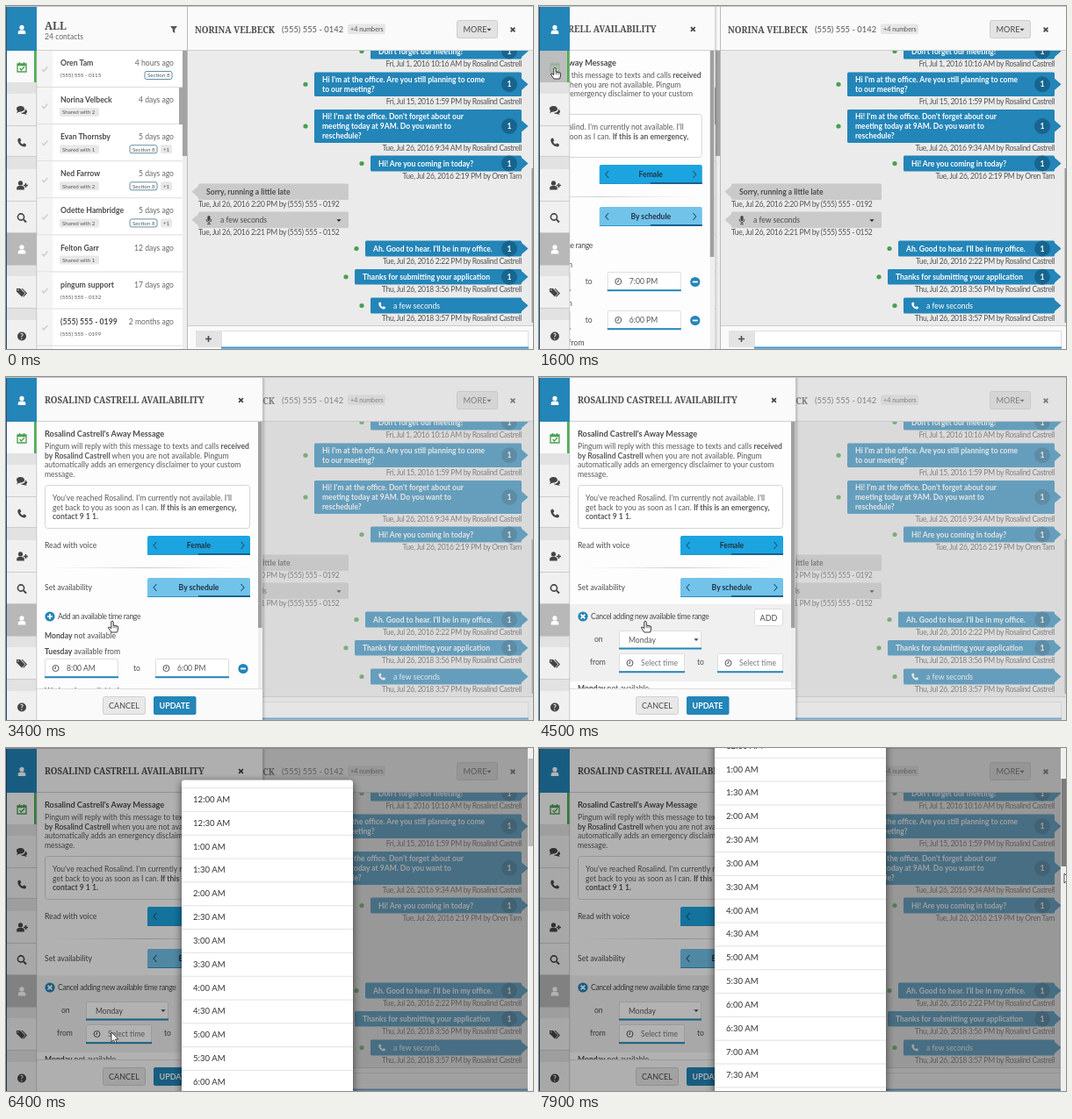
These frames come from a looping animation (600x391 px, 8 s). An HTML page:

```html
<!DOCTYPE html>
<html lang="en">
<head>
<meta charset="utf-8">
<title>Availability settings</title>
<style>
html, body { margin: 0; width: 100%; height: 100%; overflow: hidden; background: #fff; }
svg { display: block; width: 600px; height: 391px; font-family: Lato, "Open Sans", sans-serif; font-size: 8.6px; }
.slab { font-family: "Noto Serif", "DejaVu Serif", serif; font-weight: 700; }
.b { font-weight: 700; }
.tight { letter-spacing: -.35px; }
</style>
</head>
<body>
<svg id="stage" viewBox="0 0 600 391"></svg>
<script>
const BLUE = '#2385b8', INK = '#4c4c4c', BAR = '#fafafa', ME = 'Rosalind Castrell', LOOP = 8000;

// Markup helpers
const rect = (x, y, w, h, fill, extra = '') => `<rect x="${x}" y="${y}" width="${w}" height="${h}" fill="${fill}" ${extra}/>`;
const line = (x1, y, x2, color) => rect(x1, y, x2 - x1, 1, color);
const circle = (x, y, r, fill) => `<circle cx="${x}" cy="${y}" r="${r}" fill="${fill}"/>`;
const path = (d, fill = 'none', extra = '') => `<path d="${d}" fill="${fill}" ${extra}/>`;
const stroke = (d, color, w = 1.2) => path(d, 'none', `stroke="${color}" stroke-width="${w}"`);
const group = (content, id = '', extra = '') => `<g ${id && `id="${id}"`} ${extra}>${content}</g>`;
const at = (x, y, content, scale = 1) => group(content, '', `transform="translate(${x} ${y}) scale(${scale})"`);
const text = (x, y, s, { size = 8.6, fill = INK, cls = '', anchor = 'start' } = {}) =>
  `<text x="${x}" y="${y}" font-size="${size}" fill="${fill}" class="${cls}" text-anchor="${anchor}">${s}</text>`;
const bold = s => `<tspan class="b">${s}</tspan>`;

// Icons, centred on 0,0
const icon = {
  user: c => circle(0, -2.6, 2.6, c) + path('M-4.3 5V3Q-4.3 0 0 .5Q4.3 0 4.3 3V5Z', c),
  calendar: c => stroke('M-5 -4H5V5H-5ZM-2.5 -6V-3M2.5 -6V-3M-2.4 1L-.6 3L3 -1', c, 1.3) + rect(-5, -4, 10, 2.2, c),
  chat: c => path('M-6 -1A4.5 3.2 0 1 1 0 1.7L-4 2.5L-6 4L-5 1.5Z', c) + path('M4 -1Q8 2 4.5 4L6 5.5L2 4.5Q0 4.6 -1 3.5Q4 3 4 -1Z', c),
  phone: c => path('M-4 -4.5L-2 -5L-.6 -2L-2 -.8Q-.8 1.5 1.2 2.3L2.4 .8L5 2.3L4.6 4.2Q3.6 5.4 1 4.6Q-3.4 3 -4.6 -1.6Q-4.9 -3.6 -4 -4.5Z', c),
  addUser: c => at(-1.5, 0, icon.user(c)) + stroke('M2 0H7M4.5 -2.5V2.5', c, 1.5),
  search: c => `<circle cx="-1" cy="-1" r="3.6" fill="none" stroke="${c}" stroke-width="1.6"/>` + stroke('M2 2L5 5', c, 2),
  tags: c => path('M-6 -4.5H-2L3.5 1L0 5L-6 -1Z', c) + path('M-.5 -4.5H.8L6 1L2 5.2L1.2 4.4L4.3 1Z', c) + circle(-4.2, -2.8, .8, '#eee'),
  help: c => circle(0, 0, 5, c) + text(0, 3, '?', { fill: '#eee', cls: 'b', anchor: 'middle' }),
  close: c => stroke('M-2.4 -2.4L2.4 2.4M2.4 -2.4L-2.4 2.4', c, 1.7),
  filter: c => path('M-4 -4H4L1.2 -.5V4L-1.2 2.3V-.5Z', c),
  clock: c => `<circle r="3.5" fill="none" stroke="${c}"/>` + stroke('M0 -2.2V.4H-1.6', c, .9),
  mic: c => rect(-1.6, -5, 3.2, 6, c, 'rx="1.6"') + stroke('M-3 -1Q-3 2.5 0 2.5Q3 2.5 3 -1M0 2.5V4.6M-2 4.6H2', c, .9),
  caret: c => path('M-2.6 -1.2H2.6L0 1.6Z', c),
  plus: c => circle(0, 0, 5.6, c) + stroke('M-3 0H3M0 -3V3', '#fff', 1.7),
  minus: c => circle(0, 0, 5.6, c) + stroke('M-3 0H3', '#fff', 1.8),
  cancel: c => circle(0, 0, 5.6, c) + icon.close('#fff'),
  check: c => stroke('M-3 0L-1 2.4L3.4 -2.6', c, 1.6),
};
const put = (name, x, y, color = '#444', scale = 1) => at(x, y, icon[name](color), scale);

function nav() {
  const items = [['chat', 100, 37], ['phone', 137, 35], ['addUser', 186, 37], ['search', 223, 36],
                 ['user', 259, 37], ['tags', 308, 37], ['help', 358, 34]];
  return rect(0, 0, 35, 391, '#e2e2e2') + rect(1, 0, 34, 51, BLUE) + put('user', 18, 27, '#fff') +
    rect(1, 51, 34, 36, '#fafafa') + rect(1, 51, 34, 36, '#bdbdbd', 'id="navHover"') +
    group(put('calendar', 18, 70, '#4a9f51'), 'calendar') + rect(32, 51, 3, 36, '#4caf50') +
    items.map(([name, y, h]) => {
      const active = name === 'user';
      return rect(1, y, 34, h, active ? '#b8b8b8' : '#f0f0f0') + line(1, y + h - 1, 35, '#ccc') +
        put(name, 18, y + 18.5, active ? '#fff' : '#444');
    }).join('') + rect(34.5, 51, .7, 340, '#bbb') + rect(0, 0, 1, 391, '#23507a');
}

function contacts() {
  const rows = [
    ['Oren Tam', '4 hours ago', '(555) 555 - 0115', 1], ['Norina Velbeck', '4 days ago', 'Shared with 2', 0],
    ['Evan Thornsby', '5 days ago', 'Shared with 1', 2], ['Ned Farrow', '5 days ago', 'Shared with 2', 2],
    ['Odette Hambridge', '5 days ago', 'Shared with 2', 2], ['Felton Garr', '12 days ago', 'Shared with 1', 0],
    ['pingum support', '17 days ago', '(555) 555 - 0132', 0], ['(555) 555 - 0199', '2 months ago', '(555) 555 - 0199', 0]];
  const small = { size: 6.2, fill: '#555' };
  const row = ([name, ago, note, tags], i) => {
    const y = 51 + i * 42.1, tagX = tags === 2 ? 141 : 158;
    return rect(35, y, 18, 42, '#f4f4f4') + put('check', 44, y + 21, '#d2d2d2') + line(35, y + 41, 201, '#dcdcdc') +
      text(62, y + 17, name, { size: 8.7, cls: 'b' }) + text(191, y + 17, ago, { fill: '#666', anchor: 'end' }) +
      (note[0] === 'S' ? rect(61, y + 23, 45, 10, '#e8e8e8', 'rx="2"') : '') + text(64 - (note[0] === '(') * 2, y + 30.3, note, small) +
      (tags ? rect(tagX, y + 23.5, 31, 9, '#fff', 'rx="2" stroke="#3a7391" stroke-width=".8"') + text(tagX + 3, y + 30.3, 'Section 8', small) : '') +
      (tags === 2 ? rect(176, y + 23, 13, 10, '#e8e8e8', 'rx="2"') + text(179, y + 30.3, '+1', small) : '');
  };
  return rect(35, 0, 171, 391, '#fff') + rows.map(row).join('') + rect(35, 388, 18, 3, '#f4f4f4') +
    rect(35, 0, 171, 51, BAR) + line(35, 50, 206, '#cfcfcf') +
    text(44, 27, 'ALL', { size: 12, cls: 'slab' }) + text(44, 38, '24 contacts', { fill: '#666' }) +
    put('filter', 191, 27, '#555') + rect(197, 93, 4, 42, '#a5a5a5') +
    rect(201, 51, 5, 340, '#eee') + rect(201, 51, 5, 120, '#a3a3a3') + rect(206, 0, 1, 391, '#bbb');
}

const meta = (y, s, x = 587, anchor = 'end') => text(x, y, s, { fill: '#555', cls: 'tight', anchor });

function bubble(x, top, w, h, fill, tipX) {
  const mid = top + h / 2, base = tipX < x ? x + 1 : x + w - 1;
  return rect(x, top, w, h, fill, 'rx="1.5"') + path(`M${base} ${mid - 7.5}L${tipX} ${mid}L${base} ${mid + 7.5}Z`, fill);
}

function outgoing(x, top, bottom, lines, stamp, count = true) {
  const mid = (top + bottom) / 2;
  return bubble(x, top + .6, 587 - x, bottom - top - 1.2, BLUE, 594.5) + circle(x - 10, mid, 2.6, '#48a04e') +
    lines.map((s, i) => text(x + 9, mid + 3 + (i - (lines.length - 1) / 2) * 11.2, s, { size: 8.5, fill: '#fff', cls: 'b' })).join('') +
    (count ? circle(573, mid, 9, '#17658f') + text(573, mid + 3, 1, { fill: '#fff', anchor: 'middle', cls: 'b' }) : '') +
    meta(bottom + 8, stamp);
}

const incoming = (y, content, stamp) =>
  bubble(219, y, 171, 18.5, '#cacaca', 211.5) + content + meta(y + 26.5, stamp, 219, 'start');

function thread() {
  const tue = 'Tue, Jul 26, 2016 ', thu = 'Thu, Jul 26, 2018 ', by = ' by ' + ME;
  return rect(207, 0, 393, 391, '#ebebeb') +
    outgoing(415, 42, 61, ["Don't forget our meeting!"], 'Fri, Jul 1, 2016 10:16 AM' + by) +
    outgoing(351, 75, 103.5, ["Hi I'm at the office. Are you still planning to come", 'to our meeting?'], 'Fri, Jul 15, 2016 1:59 PM' + by) +
    outgoing(351, 117.5, 156.5, ["Hi! I'm at the office. Don't forget about our", 'meeting today at 9AM. Do you want to', 'reschedule?'], tue + '9:34 AM' + by) +
    outgoing(415, 170, 189, ['Hi! Are you coming in today?'], tue + '2:19 PM by Oren Tam') +
    incoming(202.5, text(228, 215, 'Sorry, running a little late', { cls: 'b' }), tue + '2:20 PM by (555) 555 - 0192') +
    incoming(234.5, put('mic', 231, 244) + text(244, 247, 'a few seconds') + put('caret', 379, 244.5, '#222'), tue + '2:21 PM by (555) 555 - 0152') +
    outgoing(409, 267, 286, ["Ah. Good to hear. I'll be in my office."], tue + '2:22 PM' + by) +
    outgoing(397, 299.5, 318, ['Thanks for submitting your application'], thu + '3:56 PM' + by) +
    outgoing(415, 332, 351, [], thu + '3:57 PM' + by, false) +
    put('phone', 428, 341.5, '#fff', .8) + text(441, 344.5, 'a few seconds', { fill: '#fff' }) +
    rect(598.5, 185, 1.5, 176, '#999') +
    rect(207, 0, 393, 51, BAR) + line(207, 50, 600, '#cfcfcf') +
    text(215, 30.5, 'NORINA VELBECK', { size: 9.9, cls: 'slab' }) + text(314, 30, '(555) 555 - 0142', { size: 9.4, fill: '#555' }) +
    rect(389, 20.5, 43, 11.5, '#e6e6e6', 'rx="2"') + text(392, 29, '+4 numbers', { size: 7.2, fill: '#555' }) +
    rect(513.5, 16.5, 46, 20, '#e3e3e3', 'rx="2" stroke="#cecece"') + text(520.5, 30, 'MORE', { size: 9.2 }) +
    put('caret', 550, 27) + put('close', 577, 27) +
    rect(207, 364, 393, 27, BAR) + line(207, 364, 600, '#ccc') +
    rect(245.5, 370.5, 349, 20, '#fff', 'stroke="#ddd"') + rect(216, 370, 29.5, 19, '#e3e3e3') +
    stroke('M227 379.5H234M230.5 376V383', INK, 1.6) + rect(245, 388.5, 350, 2, '#3b8fd0');
}

function field(x, y, w, label, faint) {
  return rect(x + .5, y + .5, w - 1, 21, '#fff', 'rx="1" stroke="#ddd"') + rect(x, y + 20.2, w, 2, BLUE) +
    put('clock', x + 12.5, y + 11, '#555') + text(x + 25, y + 14, label, { fill: faint ? '#777' : '#555' });
}
const dayRow = (y, day, from, to) => text(44, y, bold(day) + ' available from') + field(44, y + 5, 84, from) +
  text(145, y + 19, 'to') + field(170, y + 5, 84, to) + put('minus', 270, y + 16.5, BLUE);

function stepper(y, label, value, fill) {
  return text(44, y + 14, label) + rect(161, y, 117, 22, fill, 'rx="2"') + rect(219, y + 20, 59, 2, '#17628e') +
    rect(161, y + 21, 58, 1, '#2b93c6') + stroke(`M171.5 ${y + 7}L168 ${y + 11}L171.5 ${y + 15}M267.5 ${y + 7}L271 ${y + 11}L267.5 ${y + 15}`, '#1c5677', 1.1) +
    text(219.5, y + 14, value, { cls: 'b', fill: '#234', anchor: 'middle' });
}

function panel() {
  const copy = [`Pingum will reply with this message to texts and calls ${bold('received')}`,
    `${bold('by ' + ME)} when you are not available. Pingum`,
    'automatically adds an emergency disclaimer to your custom', 'message.'];
  const away = ["You've reached Rosalind. I'm currently not available. I'll",
    `get back to you as soon as I can. ${bold('If this is an emergency,')}`, bold('contact 9 1 1.')];
  const form = rect(35, 259, 252, 88, '#f0f0f0') + put('cancel', 50, 273, BLUE) +
    text(59, 276, 'Cancel adding new available time range', { cls: 'tight' }) +
    rect(245.5, 264.5, 32, 19, '#fff', 'rx="2" stroke="#ddd"') + text(261.5, 277.5, 'ADD', { size: 9, anchor: 'middle' }) +
    text(63, 302, 'on') + rect(91.5, 289.5, 93, 20, '#fff', 'rx="1" stroke="#ddd"') + rect(91, 308.5, 94, 2, BLUE) +
    text(102, 302.5, 'Monday', { fill: '#555' }) + put('caret', 179, 299.5) +
    text(58, 328, 'from') + field(91, 315, 75, 'Select time', true) + text(180, 328, 'to') + field(203, 315, 75, 'Select time', true);
  return rect(292, 0, 4, 391, 'url(#shade)') + rect(35, 0, 257, 391, '#fdfdfd') +
    text(44, 68, bold(ME + "'s Away Message"), { size: 9.2 }) +
    copy.map((s, i) => text(44, 82 + i * 10.7, s, { fill: '#5a5a5a' })).join('') +
    rect(44.5, 123.5, 233, 49, '#fff', 'rx="3" stroke="#d5d5d5"') +
    away.map((s, i) => text(53, 141 + i * 10.6, s, { fill: '#5a5a5a' })).join('') +
    stepper(181, 'Read with voice', 'Female', '#1ba4e0') + line(44, 217, 278, 'url(#rule)') +
    stepper(229, 'Set availability', 'By schedule', '#72c3ea') +
    group(put('plus', 50, 273, BLUE) + text(59, 276, 'Add an available time range', { cls: 'tight' }), 'addLink') +
    group(form, 'form') +
    group(dayRow(298, 'Monday', '9:00 AM', '7:00 PM') +
      rect(255.5, 303.5, 29, 22, 'none', 'id="focusRing" stroke="#aaa"'), 'monday') +
    group(group(text(44, 298, bold('Monday') + ' not available'), 'mondayOff') +
      group(dayRow(342, 'Tuesday', '8:00 AM', '6:00 PM') + dayRow(387, 'Wednesday', '9:00 AM', '5:00 PM'), 'laterDays'), 'days') +
    rect(287, 51, 5, 340, '#eee') + rect(287, 51, 4.5, 235, '#a0a0a0') +
    rect(35, 0, 257, 51, BAR) + line(35, 50, 292, '#cfcfcf') +
    text(44, 30, ME.toUpperCase() + ' AVAILABILITY', { size: 9.8, cls: 'slab' }) + put('close', 267.5, 26.5) +
    group(rect(35, 355, 257, 36, BAR) + line(35, 355, 292, '#ddd') +
      rect(110.5, 364.5, 48, 20, '#e8e8e8', 'rx="2" stroke="#d0d0d0"') + text(134.5, 378, 'CANCEL', { size: 9, anchor: 'middle' }) +
      rect(168, 364, 48.5, 21, BLUE, 'rx="2"') + text(192, 378, 'UPDATE', { size: 9, cls: 'b', fill: '#fff', anchor: 'middle' }), 'footer');
}

function timeList() {
  const pitch = 26.83, box = 'rx="3"';
  return rect(200, 39, 195, 1330, '#000', box + ' opacity=".6" filter="url(#blur)"') + rect(200, 36.5, 195, 1330, '#fff', box) +
    Array.from({ length: 48 }, (_, i) => {
      const hour = Math.floor(i / 2), y = 58.5 + i * pitch;
      const label = `${hour % 12 || 12}:${i % 2 ? '30' : '00'} ${hour < 12 ? 'AM' : 'PM'}`;
      return line(200, y - pitch / 2, 395, '#e2e2e2') + text(213, y + 3.5, label, { size: 9.6, fill: '#333' });
    }).join('');
}

const tooltip = path('M39 68L43 64V59H136V77H43V72Z', '#777', 'opacity=".5"') +
  `<text x="45" y="71.5" font-size="9.6" fill="#f4f4f4" class="b" letter-spacing=".9">AVAILABILITY</text>`;
const arrow = path('M0 0V11L2.6 8.7L4.3 12.4L6 11.6L4.4 8H8Z', '#fff', 'stroke="#222" stroke-width=".8"');
const hand = path('M-1.2 1Q0 -1 1.2 1V5L6 6Q7 6.5 6.6 9L5.6 13H-1L-4.5 8Q-4.5 6.5 -3 7.2L-1.2 8.6Z', '#fff', 'stroke="#222" stroke-width=".9"') +
  stroke('M2.8 6V8.4M4.6 6.2V8.6M1.2 5V8', '#333', .6);

document.getElementById('stage').innerHTML =
  `<defs><linearGradient id="shade"><stop stop-opacity=".18"/><stop offset="1" stop-opacity="0"/></linearGradient>
   <linearGradient id="rule"><stop stop-color="#ddd" stop-opacity="0"/><stop offset=".5" stop-color="#ccc"/><stop offset="1" stop-color="#ddd" stop-opacity="0"/></linearGradient>
   <filter id="blur" x="-20%" width="140%"><feGaussianBlur stdDeviation="5"/></filter></defs>` +
  contacts() + thread() + rect(207, 1, 393, 390, '#c0c0c0', 'id="fade"') + group(panel(), 'panel') + nav() +
  group(tooltip, 'tooltip') + rect(0, 0, 600, 1, '#c4c4c4') +
  group(rect(0, 0, 600, 391, '#000', 'opacity=".3"') + group(timeList(), 'times') +
    rect(594, 0, 6, 391, '#f0f0f0') + rect(594.5, 12, 5.5, 100, '#bbb', 'id="thumb"'), 'modal') +
  group(group(arrow, 'arrow') + group(hand, 'hand'), 'cursor');

const el = {};
document.querySelectorAll('[id]').forEach(node => { el[node.id] = node; });
const show = (node, on) => node.setAttribute('display', on ? 'inline' : 'none');
const move = (node, x, y) => node.setAttribute('transform', `translate(${x} ${y})`);
const alpha = (node, a) => node.setAttribute('opacity', a);
const ramp = (t, a, b) => Math.min(1, Math.max(0, (t - a) / (b - a)));
const ease = p => p * p * (3 - 2 * p);

const stops = [[200, -14, 110], [800, 18, 70], [1900, 18, 70], [2600, 260, 318], [2950, 260, 318], [3400, 121, 278],
  [4700, 121, 278], [5200, 130, 287], [5700, 130, 287], [6000, 120, 324], [6550, 120, 324], [7150, 598, 120], [7300, 598, 120], [7850, 598, 143]];

function cursorAt(t) {
  const next = stops.findIndex(s => s[0] > t);
  if (next < 1) return stops[next === 0 ? 0 : stops.length - 1].slice(1);
  const [t0, x0, y0] = stops[next - 1], [t1, x1, y1] = stops[next], p = ease(ramp(t, t0, t1));
  return [x0 + (x1 - x0) * p, y0 + (y1 - y0) * p];
}

function draw(t) {
  const removed = t >= 3000, adding = t >= 3900, drag = ease(ramp(t, 7300, 7850));
  const hovering = t >= 700 && t < 2000;
  show(el.navHover, hovering);
  alpha(el.calendar, hovering ? .3 : 1);
  alpha(el.tooltip, ramp(t, 800, 1000) * (1 - ramp(t, 1300, 1500)));

  show(el.panel, t >= 1400);
  move(el.panel, -262 * (1 - ease(ramp(t, 1300, 1800))), 0);
  show(el.monday, !removed);
  show(el.focusRing, t >= 2700);
  show(el.mondayOff, removed);
  move(el.laterDays, 0, removed ? -26 : 0);
  show(el.addLink, !adding);
  show(el.form, adding);
  move(el.days, 0, adding ? 60 : 0);
  show(el.footer, removed);
  move(el.footer, 0, 36 * (1 - ease(ramp(t, 2900, 3200))));
  alpha(el.fade, .42 * ramp(t, 2900, 3200));

  show(el.modal, t > 6000);
  alpha(el.modal, ramp(t, 6000, 6300));
  move(el.times, 0, -88 * drag);
  el.thumb.setAttribute('y', 12 + 23 * drag);
  el.thumb.setAttribute('fill', t >= 7200 ? '#7c7c7c' : '#bbb');

  const pointing = (t >= 700 && t < 2000) || (t >= 3300 && t < 5800);
  show(el.hand, pointing);
  show(el.arrow, !pointing);
  move(el.cursor, ...cursorAt(t));
}

const start = performance.now();
function tick() {
  const t = (performance.now() - start) % LOOP;
  draw(Math.floor(t / 100) * 100);
  requestAnimationFrame(tick);
}
tick();
</script>
</body>
</html>
```
